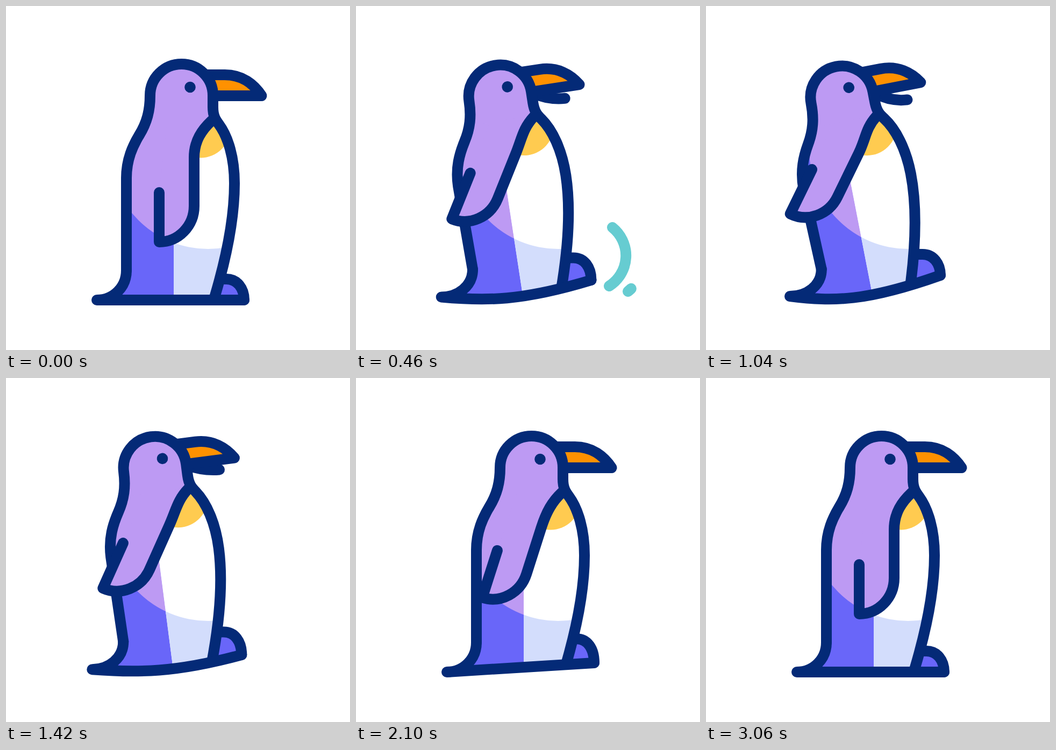
These frames come from a looping animation (640x640 px, 3100 ms). An HTML page:

```html
<!DOCTYPE html>
<html lang="en">
<head>
<meta charset="utf-8">
<title>Penguin</title>
<style>
  html, body { margin: 0; width: 100%; height: 100%; overflow: hidden; background: #fff; }
  svg { display: block; width: 100vw; height: 100vh; }
  .line { fill: none; stroke: #042a77; stroke-width: 20; stroke-linecap: round; stroke-linejoin: round; }
  .mark { fill: none; stroke: #66ccd1; stroke-width: 20; stroke-linecap: round; }
  .lilac { fill: #bd9af3; }
  .blue { fill: #6966f9; }
</style>
</head>
<body>
<svg viewBox="0 0 640 640">
  <defs>
    <clipPath id="aboveBase"><path id="basePath"/></clipPath>
    <clipPath id="inBody"><path id="bodyPath"/></clipPath>
    <clipPath id="inLight">
      <path id="light" d="M-300,-300 H900 V268 H560 A184,184 0 0 1 192,268 H-300 Z"/>
    </clipPath>
  </defs>

  <path class="mark" id="inner" pathLength="100" d="M471,521 A67,67 0 0 0 477,412"/>
  <path class="mark" id="outer" pathLength="100" d="M506,531 A112,112 0 0 0 516,367"/>

  <path class="blue" id="footFill"/>
  <path class="line" id="foot"/>

  <g clip-path="url(#aboveBase)">
    <path class="blue" id="tailFill"/>
    <g id="lean">
      <path class="line" id="jaw"/>
      <path class="line" style="fill:#ff9100" d="M370,128 H407 C440,128 462,146 475.500,167 H380"/>
      <g clip-path="url(#inBody)">
        <rect class="blue" x="100" y="60" width="212" height="600"/>
        <rect x="312" y="60" width="200" height="600" fill="#d3ddfc"/>
        <g clip-path="url(#inLight)">
          <rect class="lilac" x="100" y="60" width="212" height="600"/>
          <rect x="312" y="60" width="200" height="600" fill="#fff"/>
        </g>
        <circle cx="362" cy="227" r="55.500" fill="#ffcb50"/>
        <rect class="lilac" x="200" y="60" width="220" height="152"/>
      </g>
      <path class="line" id="outline"/>
      <path class="lilac" id="wingFill"/>
      <path class="line" id="wing"/>
      <circle cx="342.500" cy="151" r="10.300" fill="#042a77"/>
    </g>
  </g>
  <path class="line" id="ground"/>
</svg>
<script>
const LOOP = 3100;
const HIP = [308, 550];
const SHOULDER = [357.5, 263];

// [time in ms, value]
const LEAN = [[0, 0], [240, 5], [460, 8.7], [1040, 11], [1160, 11.3], [1420, 7.4], [1620, 1.3], [1760, 0], [LOOP, 0]];
const WING = [[0, 0], [240, 17], [460, 30.6], [1040, 37], [1160, 41], [1420, 31.5], [1760, 11], [2100, 17.7], [2400, 22], [2660, 18], [3060, 0], [LOOP, 0]];
const LIFT = [[0, 0], [240, 21], [460, 37], [1040, 46], [1160, 47.5], [1420, 32], [1760, 9], [2100, 17], [2400, 22], [2660, 19], [3060, 0], [LOOP, 0]];

const $ = id => document.getElementById(id);
const set = (id, d) => $(id).setAttribute('d', d);
const add = (a, b, k = 1) => [a[0] + b[0] * k, a[1] + b[1] * k];
const mix = (a, b, k) => [a[0] + (b[0] - a[0]) * k, a[1] + (b[1] - a[1]) * k];
const pts = (...list) => list.map(p => p[0].toFixed(2) + ',' + p[1].toFixed(2)).join(' ');
const clamp = v => Math.min(1, Math.max(0, v));

function turn(p, degrees, pivot) {
  const a = degrees * Math.PI / 180, c = Math.cos(a), s = Math.sin(a);
  const x = p[0] - pivot[0], y = p[1] - pivot[1];
  return [pivot[0] + x * c - y * s, pivot[1] + x * s + y * c];
}

// Smooth curve through the keys, flat at every turning point
function sample(keys, t) {
  const rate = i => (keys[i + 1][1] - keys[i][1]) / (keys[i + 1][0] - keys[i][0]);
  const slope = i => {
    if (i === 0 || i === keys.length - 1) return 0;
    const a = rate(i - 1), b = rate(i);
    return a * b <= 0 ? 0 : 2 * a * b / (a + b);
  };
  let i = 0;
  while (i < keys.length - 2 && t >= keys[i + 1][0]) i++;
  const w = keys[i + 1][0] - keys[i][0], u = (t - keys[i][0]) / w, v = 1 - u;
  return keys[i][1] * (1 + 2 * u) * v * v + keys[i + 1][1] * u * u * (3 - 2 * u)
    + w * (slope(i) * u * v * v - slope(i + 1) * u * u * v);
}

function drawMark(id, t, drawn, erased) {
  const ease = u => 1 - (1 - u) * (1 - u);
  const part = ([from, to]) => 100 * ease(clamp((t - from) / (to - from)));
  const end = part(drawn), start = part(erased), el = $(id);
  el.style.display = end > start ? '' : 'none';
  el.setAttribute('stroke-dasharray', `0 ${start} ${end - start} 200`);
}

function drawBody(l) {
  const start = [224 + 4 * l, 492 - 19 * l];
  const shape = 'L224,320 C224,285 236,260 248,240 C262,217 268,195 268,166.500'
    + ' A58.500,58.500 0 0 1 385,166.500 V188 C385,205 390,212 396,220'
    + ` C413,243 425,282 425,330 C425,400 ${pts([408 - 3 * l, 475], [388 - 6 * l, 542])}`;
  set('outline', `M${pts(start)} ${shape}`);
  set('bodyPath', `M${start[0]},640 L${pts(start)} ${shape} L${380 - 6 * l},640 Z`);
  return start;
}

function drawWing(angle, l) {
  const at = (x, y) => add(turn([x, y], angle, SHOULDER), [-3, 1], l);
  const d = `M383,213 C${365 - 7 * l},${230 + 2 * l} ${pts(at(350, 250), at(350, 282))} L${pts(at(350, 372))}`
    + ` C${pts(at(350, 409), at(321, 439), at(285, 439))} L${pts(at(285, 347))}`;
  set('wing', d);
  set('wingFill', d + ' L300,211 H383 Z');
}

function drawBase(corner, lift, l) {
  const p0 = [169 - 13 * l, 547 - 7 * l], p3 = [443 - 7 * l, 547 - lift];
  const p1 = add(mix(p0, p3, 1 / 3), [-12, 23], l);
  const p2 = add(mix(p0, p3, 2 / 3), [-45, 36], l);
  const tail = `M${pts(corner)} C${pts(add(corner, [0, 31]), add(p0, [31, 0]), p0)}`;
  set('ground', `${tail} C${pts(p1, p2, p3)}`);
  set('tailFill', `${tail} V600 H280 V${corner[1]} Z`);
  set('basePath', `M-100,-100 H740 V${p3[1]} L${pts(p3)} C${pts(p2, p1, p0)} H-100 Z`);

  const top = 508 - lift * (1 + 0.33 * (1 - l)), x = -7 * l;
  const foot = `M${395 + x},${top} H${410 + x} C${pts([430 + x, top], [p3[0], top + 17], p3)}`;
  set('foot', foot);
  set('footFill', `${foot} L${pts(mix(p3, p2, 0.6))} Z`);
}

function draw(t) {
  const lean = sample(LEAN, t), l = lean / 11;
  $('lean').setAttribute('transform', `rotate(${-lean} ${HIP})`);
  $('light').setAttribute('transform', `rotate(${lean} ${HIP})`);
  const start = drawBody(l);
  drawWing(sample(WING, t), l);
  drawBase(turn(start, -lean, HIP), sample(LIFT, t), l);
  set('jaw', `M388,${167 + 4 * l} Q415,${167 + 25 * l} 445,${167 + 27 * l}`);
  drawMark('inner', t, [300, 460], [520, 720]);
  drawMark('outer', t, [457, 640], [640, 840]);
}

const begin = performance.now();
function tick() {
  draw((performance.now() - begin) % LOOP);
  requestAnimationFrame(tick);
}
tick();
</script>
</body>
</html>
```
